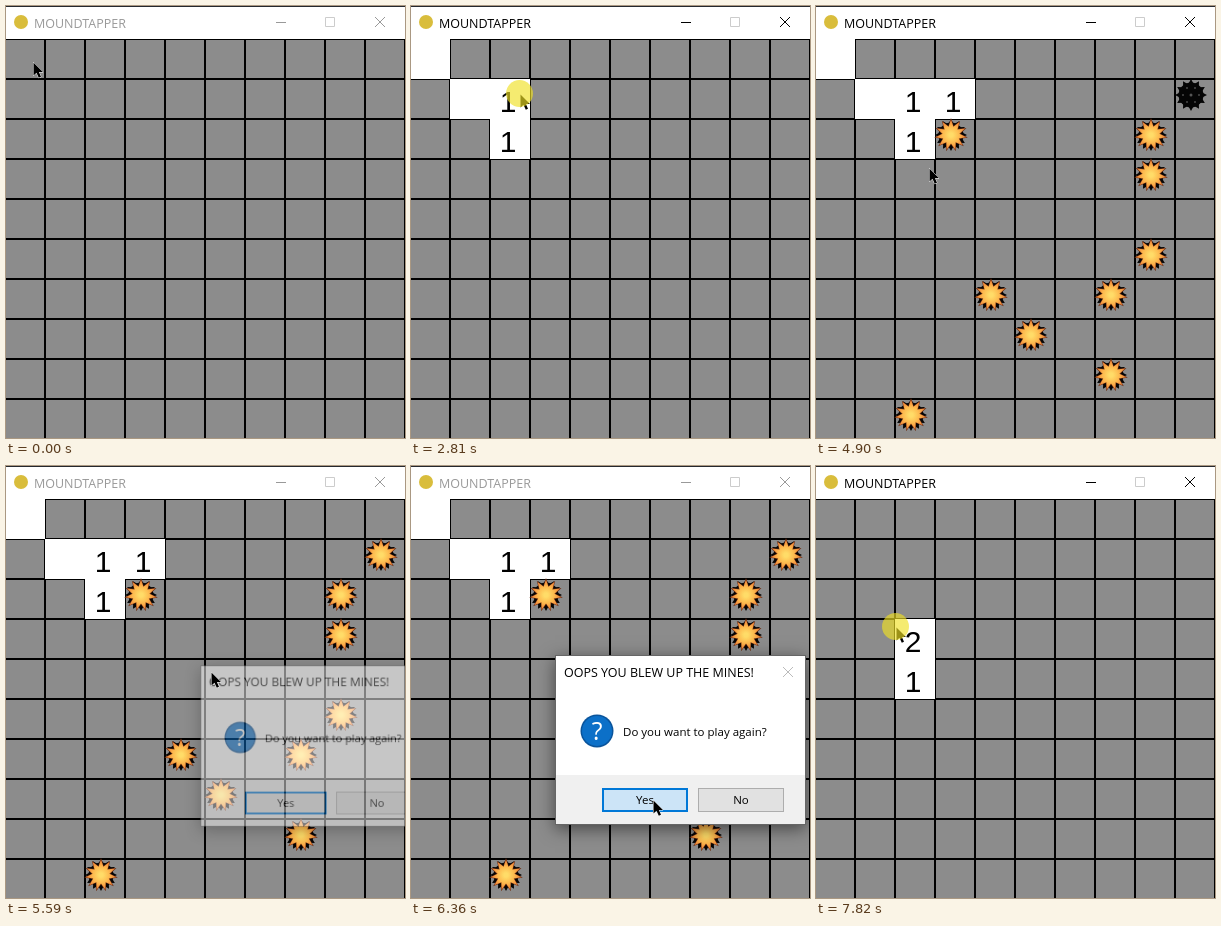
Write an HTML page with a canvas that moves like this. It is 399 px wide and 432 px high and loops after 8000 ms.

```html
<!DOCTYPE html>
<html>
<head>
<meta charset="utf-8">
<style>
html, body { margin: 0; width: 399px; height: 432px; overflow: hidden; }
canvas { display: block; }
</style>
</head>
<body>
<canvas id="stage" width="399" height="432"></canvas>
<script>
const LOOP = 8000, RESET = 6660;
const UI = '"Open Sans", "Noto Sans", sans-serif';
const DIGITS = '30px "Liberation Sans", Arial, sans-serif';
const ctx = document.getElementById('stage').getContext('2d');

// [time, column, row, label]
const reveals = [
  [470, 0, 0, ''], [1160, 1, 1, ''], [1860, 2, 2, '1'], [2810, 2, 1, '1'],
  [3420, 3, 1, '1'], [7050, 2, 4, '1'], [7820, 2, 3, '2'],
];
// [explosion time, column, row]; each mine shows once the one before it blows up
const mines = [
  [4050, 2, 9], [4200, 3, 2], [4280, 4, 6], [4360, 5, 7], [4430, 7, 6],
  [4510, 7, 8], [4590, 8, 2], [4670, 8, 3], [4900, 8, 5], [4980, 9, 1],
];
// [first step, last step, number of steps, x, y]
const moves = [
  [70, 300, 4, 25, 53], [850, 1160, 4, 69, 88], [1560, 1710, 3, 102, 129],
  [2170, 2330, 3, 132, 148], [2410, 2640, 4, 109, 88], [3110, 3190, 2, 126, 89],
  [3740, 3820, 2, 131, 149], [4200, 4750, 8, 113, 162], [4980, 5290, 5, 206, 206],
  [5440, 5440, 1, 205, 206], [5670, 5740, 2, 240, 202], [5820, 6060, 4, 196, 196],
  [6210, 6360, 3, 242, 334], [6820, 6900, 2, 112, 208], [7430, 7590, 3, 80, 161],
];
const presses = [
  [470, 700], [1160, 1390], [1860, 2090], [2810, 3040], [3420, 3590],
  [3970, 4200], [5820, 6130], [6510, 6660], [7050, 7280], [7820, LOOP],
];

const within = (t, a, b) => t >= a && t < b;
const cellPos = (col, row) => [col * 40 - 1, row * 40 + 33];

function rect(c, color, x, y, w, h) {
  c.fillStyle = color;
  c.fillRect(x, y, w, h);
}

function disc(c, color, x, y, r) {
  c.fillStyle = color;
  c.beginPath();
  c.arc(x, y, r, 0, 7);
  c.fill();
}

function text(c, str, x, y, font, color, align = 'left') {
  c.font = font;
  c.fillStyle = color;
  c.textAlign = align;
  c.fillText(str, x, y);
}

function strokePath(c, d, color, width = 1) {
  c.strokeStyle = color;
  c.lineWidth = width;
  c.stroke(new Path2D(d));
}

function star(x, y, points, outer, inner, color) {
  ctx.fillStyle = color;
  ctx.beginPath();
  for (let i = 0; i < points * 2; i++) {
    const a = i * Math.PI / points - Math.PI / 2, r = i % 2 ? inner : outer;
    ctx.lineTo(x + r * Math.cos(a), y + r * Math.sin(a));
  }
  ctx.closePath();
  ctx.fill();
}

function cursorAt(t) {
  let x = 27, y = 56;
  for (const [start, end, n, toX, toY] of moves) {
    if (t < start) break;
    const done = t >= end ? n : 1 + Math.floor((t - start) / (end - start) * (n - 1) + 0.02);
    x += (toX - x) * done / n;
    y += (toY - y) * done / n;
  }
  return [Math.round(x), Math.round(y)];
}

function drawTitleBar(active) {
  const ink = active ? '#000' : '#999';
  rect(ctx, '#fff', 0, 0, 399, 33);
  rect(ctx, '#25282e', 0, 0, 399, 1);
  disc(ctx, '#d9bd3c', 15, 16, 7);
  text(ctx, 'MOUNDTAPPER', 28, 22, '12.5px ' + UI, ink);
  strokePath(ctx, 'M270 16.5H280', ink);
  strokePath(ctx, 'M319.5 11.5H328.5V20.5H319.5Z', '#ccc');
  strokePath(ctx, 'M369 11L379 21M379 11L369 21', ink);
}

function drawBoard(t) {
  for (let col = 0; col < 10; col++) {
    for (let row = 0; row < 10; row++) {
      const [x, y] = cellPos(col, row);
      rect(ctx, '#000', x, y, 40, 40);
      rect(ctx, '#8c8c8c', x + 1, y + 1, 38, 38);
    }
  }
  for (const [time, col, row, label] of reveals) {
    if (t < time || (time < RESET && t >= RESET)) continue;
    const [x, y] = cellPos(col, row);
    rect(ctx, '#fff', x, y, 40, 40);
    text(ctx, label, x + 18, y + 33, DIGITS, '#000', 'center');
  }
}

function drawMine(col, row, blown) {
  const [left, top] = cellPos(col, row), x = left + 16, y = top + 16;
  star(x, y, 12, 16, 11, '#050505');
  disc(ctx, '#050505', x, y, 12.5);
  if (!blown) {
    for (let i = 0; i < 6; i++) {
      disc(ctx, '#4a4a4a', x + 8 * Math.cos(i * Math.PI / 3), y + 8 * Math.sin(i * Math.PI / 3), 1);
    }
    disc(ctx, '#555', x, y, 1.5);
    return;
  }
  star(x, y, 11, 17, 9.5, '#6b2d12');
  const glow = ctx.createRadialGradient(x, y, 2, x, y, 15);
  glow.addColorStop(0, '#ffdc68');
  glow.addColorStop(0.5, '#fdb84d');
  glow.addColorStop(1, '#ee7c35');
  star(x, y, 11, 15.5, 8.5, glow);
}

function drawMines(t) {
  let shown = 3970;
  for (const [blast, col, row] of mines) {
    if (within(t, shown, RESET)) drawMine(col, row, t >= blast);
    shown = blast;
  }
}

// The dialog is painted on its own layer so that it can fade as a whole.
const PAD = 30, DW = 251, DH = 170;
const layer = document.createElement('canvas');
layer.width = DW + PAD * 2;
layer.height = DH + PAD * 2;
const dlg = layer.getContext('2d');
dlg.translate(PAD, PAD);

function button(x, label, border, width, fill) {
  rect(dlg, border, x, 133, 86, 24);
  rect(dlg, fill, x + width, 133 + width, 86 - width * 2, 24 - width * 2);
  text(dlg, label, x + 43, 149, '11.5px ' + UI, '#000', 'center');
}

function paintDialog(hover) {
  dlg.clearRect(-PAD, -PAD, layer.width, layer.height);
  dlg.shadowColor = 'rgba(0,0,0,.5)';
  dlg.shadowBlur = 16;
  dlg.shadowOffsetY = 4;
  rect(dlg, '#666', 0, 0, DW, DH);
  dlg.shadowColor = 'transparent';
  rect(dlg, '#fff', 1, 1, DW - 2, DH - 2);
  rect(dlg, '#f0f0f0', 1, 120, DW - 2, DH - 121);
  text(dlg, 'OOPS YOU BLEW UP THE MINES!', 9, 22, '12.5px ' + UI, '#000');
  strokePath(dlg, 'M228 12L238 22M238 12L228 22', '#bbb');
  disc(dlg, '#0a549b', 42, 76, 16.5);
  disc(dlg, '#0c70c8', 42, 76, 15);
  text(dlg, '?', 42, 85, '25px ' + UI, '#fff', 'center');
  text(dlg, 'Do you want to play again?', 68, 81, '11.5px ' + UI, '#000');
  button(47, 'Yes', '#0078d7', 2, hover ? '#cce4f7' : '#e1e1e1');
  button(143, 'No', '#adadad', 1, '#e1e1e1');
}

function drawDialog(t) {
  if (!within(t, 5590, 6820)) return;
  // Dragged by its title bar: it follows the pointer while held.
  const [px, py] = cursorAt(Math.min(Math.max(t, 5740), 6060));
  const opening = t < 5670, closing = t >= RESET;
  const scale = opening ? 0.95 : t >= 6730 ? 0.965 : closing ? 0.985 : 1;
  const w = layer.width * scale, h = layer.height * scale;
  paintDialog(t >= 6360);
  ctx.globalAlpha = opening ? 0.5 : t >= 6730 ? 0.4 : closing ? 0.75 : 1;
  ctx.drawImage(layer, px - 52 - PAD + (layer.width - w) / 2,
    py - 7 - PAD + (layer.height - h) / 2, w, h);
  ctx.globalAlpha = 1;
}

const arrow = new Path2D('M.5 .5V13.5L3.5 10.8 5.8 15.8 8 14.8 5.9 10H10Z');

function drawCursor(t) {
  const [x, y] = cursorAt(t);
  ctx.save();
  ctx.translate(x, y);
  ctx.fillStyle = '#000';
  ctx.strokeStyle = '#fff';
  ctx.lineWidth = 1;
  ctx.stroke(arrow);
  ctx.fill(arrow);
  ctx.restore();
  if (presses.some(([a, b]) => within(t, a, b))) {
    disc(ctx, 'rgba(240,224,35,.65)', x - 0.5, y - 0.5, 13.5);
  }
}

function draw(now) {
  const t = now % LOOP;
  drawBoard(t);
  drawMines(t);
  drawTitleBar(within(t, 470, 5130) || t >= RESET);
  drawDialog(t);
  drawCursor(t);
  requestAnimationFrame(draw);
}
draw(0);
</script>
</body>
</html>
```
